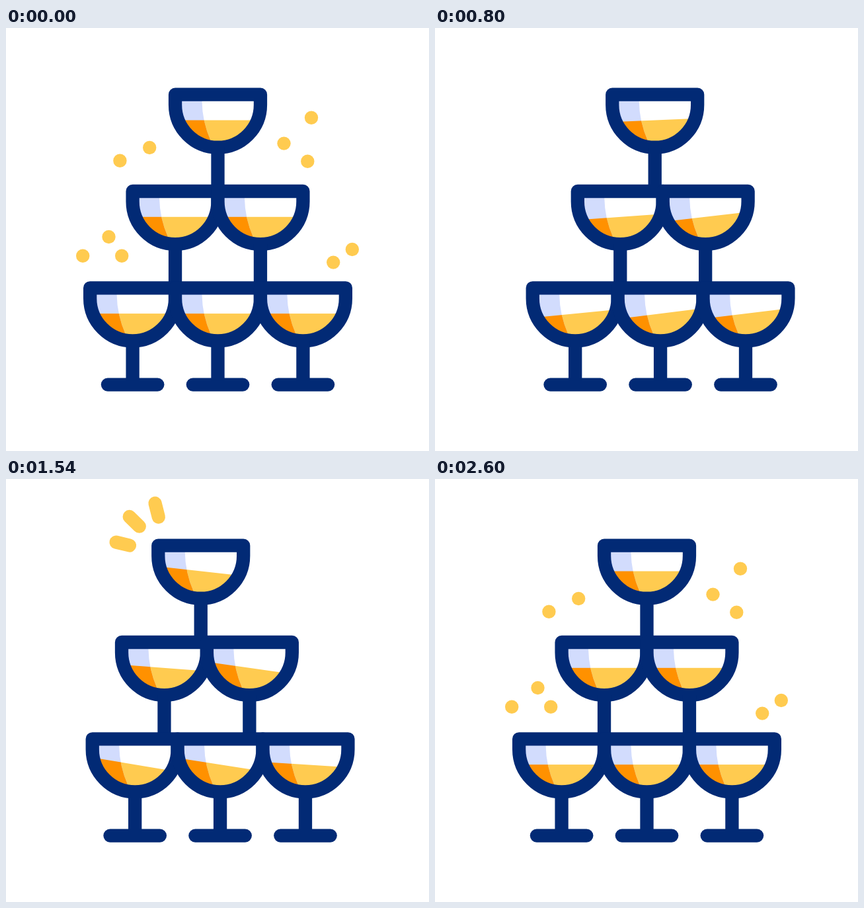
Recreate the animation shown at these times as an HTML page with a canvas. Size 640x640 px, loop 3000 ms.

```html
<!DOCTYPE html>
<html lang="en">
<head>
<meta charset="utf-8">
<title>Glass tower</title>
<style>
  html, body { margin: 0; width: 100%; height: 100%; overflow: hidden; background: #fff; }
  canvas { display: block; width: 100vw; height: 100vh; }
</style>
</head>
<body>
<canvas id="stage" width="640" height="640"></canvas>
<script>
const ctx = document.getElementById('stage').getContext('2d');
const LOOP = 3000, STEP = 20;
const NAVY = '#022a75', YELLOW = '#ffcb50', ORANGE = '#ff9100', LILAC = '#d2dcfd';
const CENTER = 320.5, GAP = 128.9, HALF = GAP / 2, STROKE = 20.3;

// Each slosh lists key times (ms) and the tilt in degrees at those times.
const ROWS = [
  { rim: 100.7, foot: 247, delay: 360, slosh: [
    { times: [600, 1050, 1800, 2250, 2600], tilts: [0, -6, 11, -4, 0] }
  ] },
  { rim: 247, foot: 393.3, delay: 180, slosh: [
    { times: [540, 1080, 1640, 2140, 2560], tilts: [0, -8.5, 5.5, -4, 0] },
    { times: [410, 1000, 1540, 2055, 2480], tilts: [0, -9, 8, -4, 0] }
  ] },
  { rim: 393.3, foot: 539.6, delay: 0, base: true, slosh: [
    { times: [460, 990, 1530, 2070, 2500], tilts: [0, -8, 9.5, -4, 0] },
    { times: [380, 910, 1450, 1980, 2400], tilts: [0, -8, 10, -4, 0] },
    { times: [300, 830, 1370, 1900, 2400], tilts: [0, -7, 6, -4, 0] }
  ] }
];
const SWAY_TIMES = [200, 700, 1200, 1700, 2200];
const SWAY_OFFSETS = [0, 26, -26, 13, 0];

// Bubble groups, each leaving a little later than the one before.
const BUBBLES = [
  [[217.2, 181], [462, 135.7], [155.5, 316], [523.8, 335]],
  [[172.4, 200.8], [420.5, 174.6], [116.2, 344.8], [495.2, 354.6]],
  [[456.3, 201.8], [175.2, 344.8]]
];

// Inner end, then outer end.
const SPARKS = [
  [230.8, 57.5, 225.5, 36.6],
  [201.8, 71.7, 186.7, 57],
  [187, 100.5, 166.6, 95.6]
];

const clamp = v => Math.min(1, Math.max(0, v));
const progress = (t, from, to) => clamp((t - from) / (to - from));
const ease = s => s * s * (3 - 2 * s);
const mix = (a, b, s) => a + (b - a) * s;

function keyed(t, times, values) {
  let i = 0;
  while (i < times.length - 2 && t >= times[i + 1]) i++;
  return mix(values[i], values[i + 1], ease(progress(t, times[i], times[i + 1])));
}

function line(x1, y1, x2, y2) {
  ctx.beginPath();
  ctx.moveTo(x1, y1);
  ctx.lineTo(x2, y2);
  ctx.stroke();
}

function bowlPath() {
  ctx.beginPath();
  ctx.moveTo(-HALF, 0);
  ctx.lineTo(HALF, 0);
  ctx.lineTo(HALF, 15.6);
  ctx.arc(0, 15.6, HALF, 0, Math.PI);
  ctx.closePath();
}

function shadePath() {
  ctx.beginPath();
  ctx.moveTo(-80, 0);
  ctx.lineTo(-24, 0);
  ctx.lineTo(-24, 10);
  ctx.quadraticCurveTo(-23.6, 41, -10.8, 70);
  ctx.lineTo(-6, 82);
  ctx.lineTo(-80, 82);
  ctx.closePath();
}

function liquid(tilt, color) {
  ctx.save();
  ctx.translate(0, 38.8);
  ctx.rotate(tilt * Math.PI / 180);
  ctx.fillStyle = color;
  ctx.fillRect(-100, 0, 200, 100);
  ctx.restore();
}

function drawGlass(x, row, tilt) {
  ctx.save();
  ctx.translate(x, row.rim);

  ctx.save();
  bowlPath();
  ctx.clip();
  ctx.fillStyle = '#fff';
  ctx.fillRect(-80, 0, 160, 90);
  liquid(tilt, YELLOW);
  shadePath();
  ctx.fillStyle = LILAC;
  ctx.fill();
  ctx.clip();
  liquid(tilt, ORANGE);
  ctx.restore();

  ctx.strokeStyle = NAVY;
  ctx.lineWidth = STROKE;
  ctx.lineJoin = 'round';
  bowlPath();
  ctx.stroke();
  const foot = row.foot - row.rim;
  ctx.lineCap = 'butt';
  line(0, 80, 0, foot);
  if (row.base) {
    ctx.lineCap = 'round';
    line(-37.7, foot, 37.7, foot);
  }
  ctx.restore();
}

function drawRow(row, t) {
  const shift = keyed(t - row.delay, SWAY_TIMES, SWAY_OFFSETS);
  const first = CENTER - (row.slosh.length - 1) * HALF + shift;
  row.slosh.forEach(({ times, tilts }, i) =>
    drawGlass(first + i * GAP, row, keyed(t, times, tilts)));
}

function drawBubbles(t) {
  ctx.fillStyle = YELLOW;
  BUBBLES.forEach((group, i) => {
    const leave = 264 + i * 84, back = 2132 + i * 84;
    const returning = t >= back;
    const rise = returning
      ? 20 * (1 - ease(progress(t, back, back + 300)))
      : -20 * ease(progress(t, leave, leave + 300));
    ctx.globalAlpha = returning
      ? progress(t, back, back + 100)
      : 1 - progress(t, leave + 240, leave + 340);
    for (const [x, y] of group) {
      ctx.beginPath();
      ctx.arc(x, y + rise, 10.2, 0, 2 * Math.PI);
      ctx.fill();
    }
  });
  ctx.globalAlpha = 1;
}

function drawSparks(t) {
  const head = ease(progress(t, 1260, 1500));
  const tail = ease(progress(t, 1580, 1860));
  if (head <= tail) return;
  ctx.strokeStyle = YELLOW;
  ctx.lineWidth = STROKE;
  ctx.lineCap = 'round';
  for (const [x1, y1, x2, y2] of SPARKS) {
    line(mix(x1, x2, tail), mix(y1, y2, tail), mix(x1, x2, head), mix(y1, y2, head));
  }
}

function render(now) {
  const t = Math.floor((now % LOOP) / STEP) * STEP;
  ctx.fillStyle = '#fff';
  ctx.fillRect(0, 0, 640, 640);
  drawBubbles(t);
  drawSparks(t);
  ROWS.forEach(row => drawRow(row, t));
}

const start = performance.now();
function tick() {
  render(performance.now() - start);
  requestAnimationFrame(tick);
}
tick();
</script>
</body>
</html>
```
